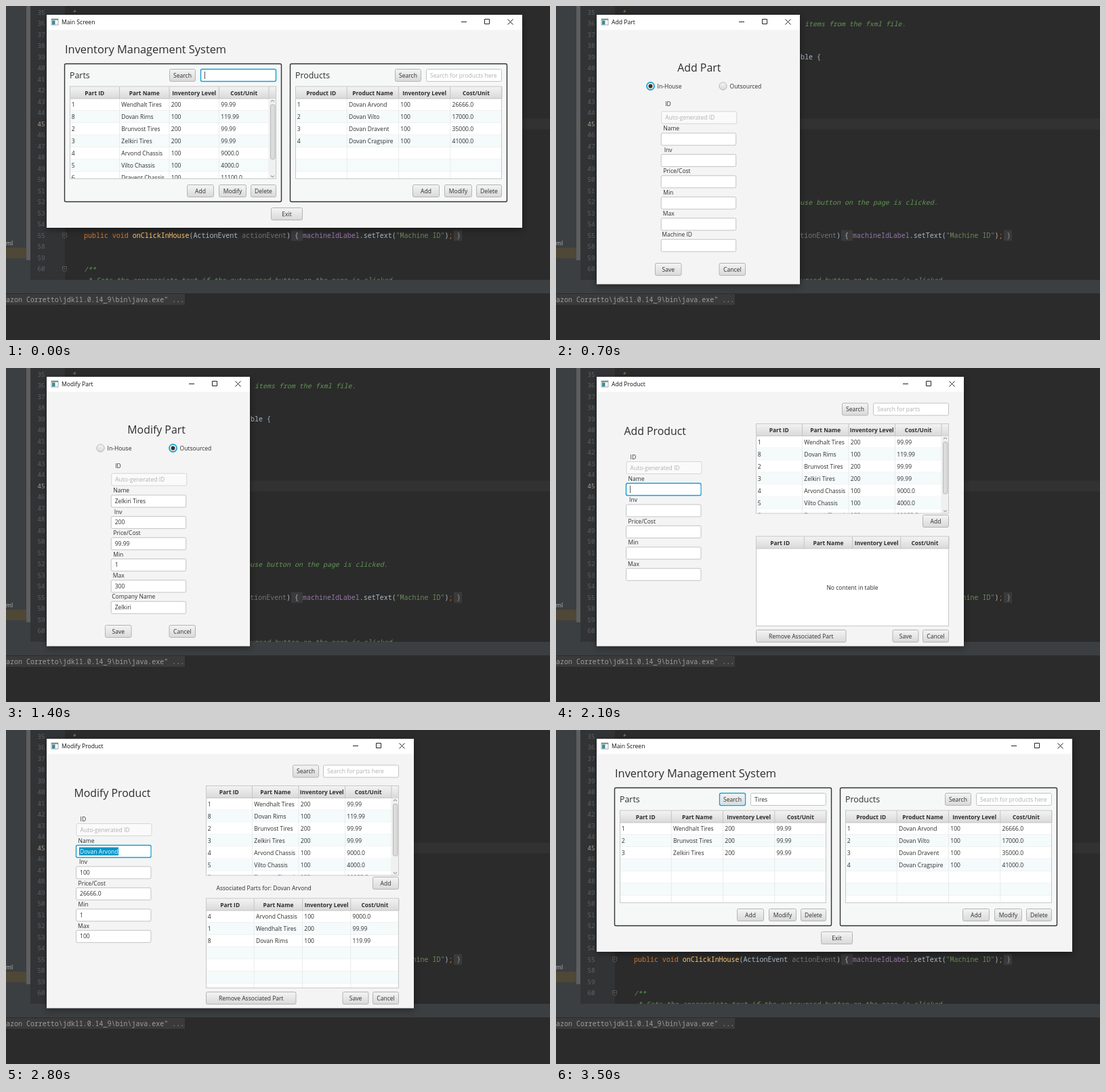
Write an HTML page that moves like this. It is 803 by 494 pixels and loops after 4200 ms.

```html
<!DOCTYPE html>
<html lang="en">
<head>
<meta charset="utf-8">
<title>Inventory Management System</title>
<style>
  html, body { margin: 0; width: 100%; height: 100%; overflow: hidden; background: #2b2b2b; }
  svg { display: block; }
  text { font: 8.55px "Open Sans", sans-serif; fill: #2d2d2d; white-space: pre; }
  .mid { text-anchor: middle; }
  .head { font-weight: bold; font-size: 8.4px; text-anchor: middle; }
  .hint { fill: #b1b1b1; }
  .off { opacity: .6; }
  .off .hint { fill: #858585; }
  .white { fill: #fff; }
  .side { fill: #bbb; }
  .bar { font-size: 8.65px; fill: #111; }
  .h1 { font-size: 16.4px; }
  .h2 { font-size: 15.85px; }
  .h3 { font-size: 12.4px; }
  .code { font: 9.97px "Noto Sans Mono", monospace; fill: #a9b7c6; }
  .doc { font-style: italic; fill: #629755; }
  .log { fill: #9d9d9d; }
  .num { font: 9.2px "Noto Sans Mono", monospace; fill: #606366; text-anchor: end; }
  .now { fill: #a4a3a3; }
  .shadow { filter: drop-shadow(0 3px 5px rgba(0, 0, 0, .4)); }
</style>
</head>
<body>
<svg id="stage" width="803" height="494" viewBox="0 0 803 494"></svg>
<script>
const STEP = 700;
const BLUE = '#139fd0';

const rect = (x, y, w, h, fill, extra = '') =>
  `<rect x="${x}" y="${y}" width="${w}" height="${h}" fill="${fill}" ${extra}/>`;
const path = (d, color = '#333', width = 1) =>
  `<path d="${d}" fill="none" stroke="${color}" stroke-width="${width}"/>`;
// y is the vertical centre of a line of body text
const text = (x, y, str, cls = '') => `<text x="${x}" y="${y + 3}" class="${cls}">${str}</text>`;
const frame = (x, y, w, h, fill, stroke, width = 1) =>
  rect(x + .5, y + .5, w - 1, h - 1, fill, `rx="2" stroke="${stroke}" stroke-width="${width}"`);

/* ---------- code editor backdrop ---------- */

const rowY = line => 9.6 + 16.5 * (line - (line > 55 ? 37 : 35));

function code(col, line, str, cls = '') {
  return `<text x="${91 + col * 6}" y="${rowY(line) + 3.5}" class="code ${cls}">${str}</text>`;
}

const paint = parts => parts.map(([str, color]) => `<tspan fill="${color}">${str}</tspan>`).join('');

function editor() {
  const lines = Array.from({ length: 26 }, (_, i) => 35 + i).filter(n => n !== 56 && n !== 57);
  const foldMark = y => path(`M83.5 ${y - 3.5}h6v5l-3 3l-3-3zM85 ${y - .5}h3`, '#606366', .8);
  const plain = '#a9b7c6', method = paint([
    ['public void ', '#cc7832'], ['onClickInHouse', '#ffc66d'], ['(ActionEvent ', plain],
    ['actionEvent', '#72737a'], [') { ', plain], ['machineIdLabel', '#9876aa'], ['.setText(', plain],
    ['"Machine ID"', '#6a8759'], [')', plain], [';', '#cc7832'], [' }', '#8c8c8c']]);
  const sets = kind => `* Sets the appropriate text if the ${kind} button on the page is clicked.`;
  return rect(0, 0, 803, 494, '#2b2b2b') + rect(36, 0, 51, 405, '#313335') +
    rect(36, 166.5, 767, 16, '#323232') +
    rect(0, 0, 36, 405, '#3c3f41') + rect(0, 357.5, 36, 15.5, '#4f4837') +
    rect(30, 0, 6, 376, '#5c5e5f') + text(0, 350.5, 'ml', 'side') +
    lines.map(n => `<text x="57.5" y="${rowY(n) + 3.3}" class="num ${n === 45 ? 'now' : ''}">${n}</text>`).join('') +
    foldMark(339.5) + foldMark(389) +
    code(1, 35, '*', 'doc') + code(46, 36, 'items from the fxml file.', 'doc') +
    code(45, 39, 'ble {') + code(5, 52, sets('in-house'), 'doc') +
    rect(421, 331.5, 17, 16, '#3a3a3a') + rect(661, 331.5, 12, 16, '#3a3a3a') +
    code(4, 55, method) + code(4, 60, '/**', 'doc') + code(5, 61, sets('outsourced'), 'doc') +
    rect(0, 405, 803, 20, '#3c3f41') + rect(0, 425, 803, 69, '#2b2b2b') +
    rect(0, 426, 264, 16, '#3a3a3a') +
    text(0, 434.5, 'azon Corretto\\jdk11.0.14_9\\bin\\java.exe" ...', 'code log');
}

/* ---------- window controls ---------- */

function appWindow(title, right, bottom, content) {
  const w = right - 60;
  return rect(60, 13, w, bottom - 13, '#f4f4f4', 'class="shadow"') + rect(60, 13, w, 22.5, '#fff') +
    rect(67, 19, 10, 9, '#fff', 'stroke="#8a9296" stroke-width=".8"') +
    rect(67, 19, 10, 2, '#8a9296') + rect(68, 21.5, 4.5, 6, '#3e8c96') +
    text(82, 23.5, title, 'bar') +
    path(`M${right - 90} 23.5h8M${right - 55.5} 19.5h7v7h-7zM${right - 21.5} 19.5l8 8m0-8l-8 8`, '#222') +
    content;
}

// pale band just inside the blue edge of a focused control
const glow = (x, y, w, h) => frame(x + 1, y + 1, w - 2, h - 2, 'none', '#c9e9f4');

function button(x, y, w, label, focused) {
  return frame(x, y, w, 19, 'url(#raised)', focused ? BLUE : '#b4b4b4', focused ? 1.4 : 1) +
    (focused ? glow(x, y, w, 19) : '') + text(x + w / 2, y + 9.5, label, 'mid');
}

function field(x, y, value = '', { hint, focused, selected, w = 112 } = {}) {
  return frame(x, y, w, 19, '#fff', focused ? BLUE : '#c3c3c3', focused ? 1.4 : 1) +
    (focused ? glow(x, y, w, 19) : '') +
    (selected ? rect(x + 5, y + 3.5, 58, 12, '#0096c9') : '') +
    (focused && !value ? path(`M${x + 6.5} ${y + 4}v11`, '#555') : '') +
    text(x + 6, y + 9.5, hint || value, hint ? 'hint' : selected ? 'white' : '');
}

function radio(x, label, on) {
  return `<circle cx="${x}" cy="118.5" r="5.6" fill="url(#raised)" stroke="${on ? BLUE : '#b4b4b4'}" stroke-width="${on ? 1.6 : 1}"/>` +
    (on ? `<circle cx="${x}" cy="118.5" r="2.9" fill="#333"/>` : '') + text(x + 10, 118.5, label);
}

function table(x, y, w, h, kind, rows, scroll) {
  const HEAD = 18.5, ROW = 18, bottom = y + h;
  const inner = w - (scroll ? 11 : 0), col = inner / 4;
  const heads = [kind + ' ID', kind + ' Name', 'Inventory Level', 'Cost/Unit'];
  let body = '', top = '';
  if (rows.length) {
    for (let r = 0; r * ROW < h - HEAD; r++) {
      body += rect(0, r * ROW, inner, ROW, r % 2 ? '#f5fafb' : '#fff') +
        path(`M0 ${r * ROW + 17.5}h${inner}`, '#f0f2f2') +
        (rows[r] || []).map((cell, c) => text(c * col + 2.8, r * ROW + 9.2, cell)).join('');
    }
    for (let c = 1; c < 5; c++) body += path(`M${c * col} 0v${h}`, '#e9ebeb');
  } else body = text(w / 2, 57.5, 'No content in table', 'mid');
  heads.forEach((name, c) => {
    top += text(x + (c + .5) * col, y + 10, name, 'head') + path(`M${x + (c + 1) * col} ${y + 1}v17.5`, '#c4c4c4');
  });
  const mid = x + w - 5.5;
  const bar = scroll ? rect(x + inner, y + HEAD, 11, h - HEAD, '#f0f0f0') +
    frame(mid - 3.5, y + 27, 7.5, h - 56, '#dcdcdc', '#b9b9b9') +
    path(`M${mid - 2.5} ${y + 23}l2.5-2l2.5 2M${mid - 2.5} ${bottom - 5}l2.5 2l2.5-2`, '#777') : '';
  return rect(x, y, w, h, '#fff') +
    `<svg x="${x}" y="${y + HEAD}" width="${w}" height="${h - HEAD}">${body}</svg>` +
    rect(x, y, w, HEAD, 'url(#raised)') + top + path(`M${x} ${y + HEAD}h${w}`, '#c4c4c4') + bar +
    rect(x + .5, y + .5, w - 1, h - 1, 'none', 'stroke="#c8c8c8"');
}

/* ---------- data ---------- */

const parts = [
  [1, 'Wendhalt Tires', 200, '99.99'], [8, 'Dovan Rims', 100, '119.99'],
  [2, 'Brunvost Tires', 200, '99.99'], [3, 'Zelkiri Tires', 200, '99.99'],
  [4, 'Arvond Chassis', 100, '9000.0'], [5, 'Vilto Chassis', 100, '4000.0'],
  [6, 'Dravent Chassis', 100, '11100.0']];
const products = [
  [1, 'Dovan Arvond', 100, '26666.0'], [2, 'Dovan Vilto', 100, '17000.0'],
  [3, 'Dovan Dravent', 100, '35000.0'], [4, 'Dovan Cragspire', 100, '41000.0']];
const tires = parts.filter(p => p[1].endsWith('Tires'));

/* ---------- screens ---------- */

function mainScreen(searched) {
  const panel = (x, title, searchBox, list) =>
    frame(x, 85, 321, 205, '#f6f8f8', '#333', 1.4) + text(x + 8, 104, title, 'h3') +
    button(x + 155, 93, 39, 'Search', searched && title === 'Parts') + searchBox + list +
    button(x + 181, 264, 40, 'Add') + button(x + 228, 264, 41, 'Modify') + button(x + 275, 264, 38, 'Delete');
  return appWindow('Main Screen', 762, 328,
    text(87, 67, 'Inventory Management System', 'h1') +
    panel(86, 'Parts', field(287, 93, searched ? 'Tires' : '', { focused: !searched }),
      table(94, 118.5, 305, 137.5, 'Part', searched ? tires : parts, !searched)) +
    panel(419, 'Products', field(620, 93, '', { hint: 'Search for products here' }),
      table(427, 118.5, 305, 137.5, 'Product', products)) +
    button(391, 298, 47, 'Exit'));
}

function form(x, y, idY, labels, values, focus) {
  const shifts = [3.5, 5, 3.5, 3.5, 3, 1.5];
  return text(x + 6.5, idY, 'ID') +
    `<g class="off">${field(x + .5, y - 32, '', { hint: 'Auto-generated ID' })}</g>` +
    labels.map((label, i) => {
      const top = y + i * 31.45, focused = focus && !i;
      return text(x + shifts[i], top - 6.3, label) +
        field(x, top, values[i], { focused, selected: focused && values[i], w: 111.5 });
    }).join('');
}

const labels = ['Name', 'Inv', 'Price/Cost', 'Min', 'Max'];

function partScreen(title, lastLabel, values, outsourced) {
  return appWindow(title, 360, 411.5,
    text(179.3, 94, title, 'h2') + radio(139.5, 'In-House', !outsourced) + radio(246.5, 'Outsourced', outsourced) +
    form(154.7, 187.5, 145, [...labels, lastLabel], values) +
    button(146, 380, 39.5, 'Save') + button(240.5, 380, 39.5, 'Cancel'));
}

function productScreen(title, hint, searchX, values, linked) {
  return appWindow(title, 602, 411.5,
    text(100.5, 96, title, 'h2') + form(103, 170, 132.3, labels, values, true) +
    button(searchX, 51.5, 39, 'Search') + field(468, 51.5, '', { hint }) +
    table(295, 82, 285, 133.5, 'Part', parts, true) + button(541, 217, 39, 'Add') +
    (linked.length ? text(310.5, 234, 'Associated Parts for: ' + values[0]) : '') +
    table(295, 248.5, 285, 133.5, 'Part', linked) +
    button(295, 387, 133.5, 'Remove Associated Part') + button(496.5, 387, 39, 'Save') + button(541, 387, 39, 'Cancel'));
}

const scenes = [
  mainScreen(false),
  partScreen('Add Part', 'Machine ID', []),
  partScreen('Modify Part', 'Company Name', ['Zelkiri Tires', '200', '99.99', '1', '300', 'Zelkiri'], true),
  productScreen('Add Product', 'Search for parts', 422, [], []),
  productScreen('Modify Product', 'Search for parts here', 423, ['Dovan Arvond', '100', '26666.0', '1', '100'],
    [parts[4], parts[0], parts[1]]),
  mainScreen(true)];

const stage = document.getElementById('stage');
stage.innerHTML = `<defs><linearGradient id="raised" x2="0" y2="1">
  <stop stop-color="#f4f4f4"/><stop offset="1" stop-color="#d9d9d9"/></linearGradient></defs>` +
  editor() + scenes.map(s => `<g class="scene">${s}</g>`).join('');
const groups = [...stage.querySelectorAll('.scene')];

function draw() {
  const current = Math.floor(performance.now() / STEP) % groups.length;
  groups.forEach((g, i) => { g.style.display = i === current ? '' : 'none'; });
  requestAnimationFrame(draw);
}
draw();
</script>
</body>
</html>
```
